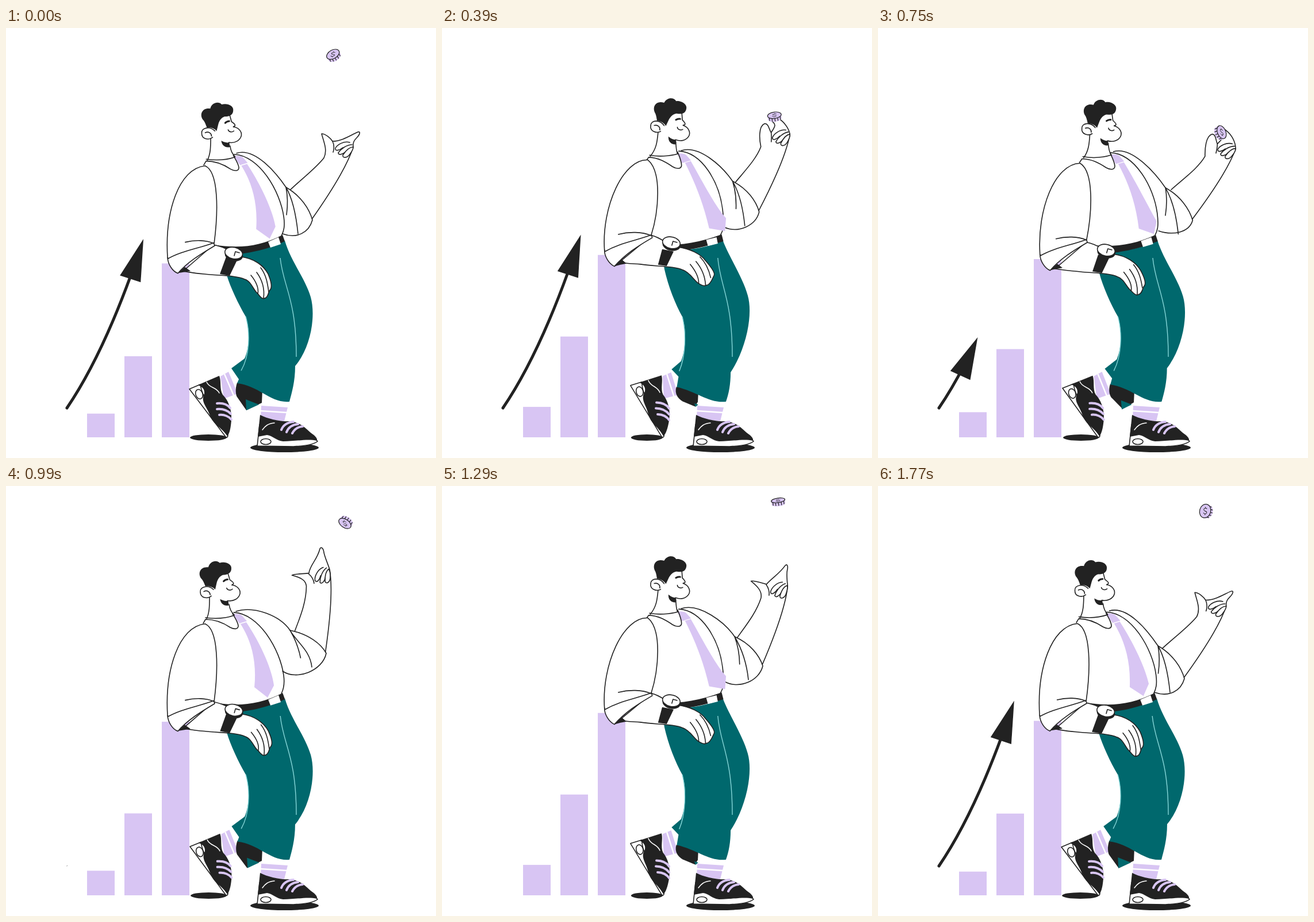
Animation, 748 px wide and 748 px high, one loop 1800 ms. Source, as an HTML page:

```html
<!DOCTYPE html>
<html lang="en">
<head>
<meta charset="utf-8">
<title>Coin toss</title>
<style>
  html, body { margin: 0; width: 100%; height: 100%; overflow: hidden; background: #fff; }
  svg { display: block; width: 100vw; height: 100vh; }
  .line { fill: none; stroke: #222; stroke-width: 1.6; stroke-linecap: round; stroke-linejoin: round; }
  .skin { fill: #fff; stroke: #222; stroke-width: 1.6; stroke-linecap: round; stroke-linejoin: round; }
  .thin { fill: none; stroke: #222; stroke-width: 1.2; }
  .brow { fill: none; stroke: #222; stroke-width: 3; stroke-linecap: round; }
  .dark { fill: #222; }
  .white { fill: #fff; }
  .teal { fill: #00686d; }
  .lilac { fill: #d8c5f3; }
  .shine { fill: none; stroke: #86d6d8; stroke-width: 1.4; }
  .lace { fill: none; stroke: #d8c5f3; stroke-width: 4; stroke-linecap: round; }
  .stripe { fill: none; stroke: #fff; stroke-width: 2.5; }
  .seam { fill: none; stroke: #fff; stroke-width: 1.5; stroke-linecap: round; }
</style>
</head>
<body>
<svg viewBox="0 0 748 748" xmlns="http://www.w3.org/2000/svg">
  <g id="bars"></g>
  <path id="shaft" class="line"/>
  <path id="arrowhead" class="dark"/>

  <ellipse id="rearShadow" class="dark" cy="712.5" ry="5.5"/>
  <g id="rearFoot">
    <path class="lilac" d="M373 606L387 598L403 636L379 645Z"/>
    <path class="stripe" d="M380 602L396 639"/>
    <path class="skin" d="M319 628L338 620C341 645 366 675 386 708C386 712 384 713 382 711Z"/>
    <path class="dark" d="M334 621L371 605C375 615 371 628 377 638C386 647 393 662 392 682C391 696 389 705 385 710C373 692 361 692 354 672C349 658 338 650 345 636C346 627 340 624 334 621Z"/>
    <ellipse class="skin" cx="336" cy="637" rx="6" ry="8.5" transform="rotate(-20 336 637)"/>
    <path class="seam" d="M349 616C354 627 366 624 371 635"/>
    <path class="lace" d="M367 653C378 652 386 656 390 661M367 663C378 662 386 666 391 671M371 673C380 672 388 676 392 681"/>
  </g>

  <ellipse class="dark" cx="484.500" cy="730" rx="59.500" ry="8"/>
  <path class="lilac" d="M444 657L490 660L484 684L443 679Z"/>
  <path class="stripe" d="M443 666L489 669"/>
  <path class="skin" d="M441 690L437 727L500 728C520 727 535 725 542 719L530 706Z"/>
  <path class="dark" d="M442 673C455 680 478 685 492 684C510 685 520 695 530 704C537 709 542 713 541 718C525 714 505 719 482 719C470 718 464 709 454 708L438 711Z"/>
  <ellipse class="skin" cx="452" cy="719.500" rx="9" ry="5"/>
  <path class="seam" d="M446 699C451 692 456 688 467 687"/>
  <path class="lace" d="M479 699C482 691 490 686 500 685M488 703C491 695 498 690 508 689M498 705C501 699 507 694 516 693"/>

  <path id="opening" class="dark"/>
  <path id="lining" class="teal"/>
  <path id="pants" class="teal"/>
  <path id="shineFront" class="shine"/>
  <path id="shineBack" class="shine"/>

  <g id="forearm">
    <path id="palm" class="skin"/>
    <path id="thumbLine" class="line"/>
  </g>
  <g id="coin">
    <path id="coinEdge" class="lilac"/>
    <path id="coinRidges" class="thin"/>
    <ellipse class="lilac" id="coinFace" rx="12" stroke="#222" stroke-width="1.2"/>
    <path id="coinSign" class="thin" d="M4 -4C1 -7 -5 -5 -3 -2C-2 1 4 0 4 3C3 7 -3 6 -4 3M0 -8V-5M0 5V8"/>
  </g>
  <g id="fingers">
    <path class="skin" d="M598 199C588 196 576 203 573 209C572 215 580 213 586 208"/>
    <path class="skin" d="M602 203C592 203 582 211 578 217C578 222 586 220 591 215"/>
    <path class="skin" d="M604 207C597 207 590 215 586 221C585 227 593 226 597 221C601 216 604 211 604 207"/>
  </g>
  <path id="sleeve" class="skin"/>
  <path id="sleeveFolds" class="line"/>

  <path id="torso" class="line"/>
  <path id="belt" class="dark"/>
  <path id="buckle" class="white"/>
  <path id="knot" class="lilac"/>
  <path id="tie" class="lilac"/>
  <path id="neck" class="line"/>
  <path id="collar" class="line"/>

  <g id="head">
    <path class="white" d="M365 165L388 150L392 163L410 182L390 199L362 190Z"/>
    <path class="line" d="M389 151L392 162C395 164 399 167 398 169L395 171C404 172 410 179 409 186C407 195 397 200 387 198"/>
    <path class="dark" d="M349 172C347 166 345 161 342 158C336 149 341 137 355 139C358 128 370 126 375 132C384 129 396 134 395 142C395 150 389 153 380 153C374 155 371 160 369 166L366 178C363 174 356 171 349 172Z"/>
    <path class="dark" d="M374 195C379 198 384 199 388 198L389 206C382 208 375 204 374 195Z"/>
    <path class="skin" d="M363 178C354 169 339 172 340 182C340 193 353 194 359 189"/>
    <path class="line" d="M346 181C352 178 357 182 357 187M386 176C387 180 393 181 396 178"/>
    <path class="brow" d="M381 164C383 162 385 161 388 161"/>
  </g>

  <path id="lowerArm" class="skin"/>
  <path id="handLines" class="line"/>
  <path id="cuffShade" class="dark"/>
  <path id="upperArm" class="skin"/>
  <path id="cuff" class="skin"/>
  <path id="armFold" class="line"/>
  <path id="strap" class="dark"/>
  <g id="watch">
    <ellipse class="dark" cx="396.500" cy="394.500" rx="16" ry="11" transform="rotate(12 396 394)"/>
    <ellipse class="skin" cx="396" cy="391.500" rx="15.500" ry="10" transform="rotate(12 396 392)"/>
    <path class="line" d="M397 396L399 389L406 391"/>
  </g>
</svg>
<script>
const LOOP = 1800, STEP = 30, SWAY = 900;
const part = {};
document.querySelectorAll('[id]').forEach(e => part[e.id] = e);

const set = (id, attrs) => { for (const k in attrs) part[id].setAttribute(k, attrs[k]); };
const mix = (a, b, k) => a + (b - a) * k;
const sway = (t, phase) => (1 - Math.cos(2 * Math.PI * (t - phase) / SWAY)) / 2;
const smooth = (a, b, t) => { const x = Math.min(1, Math.max(0, (t - a) / (b - a))); return x * x * (3 - 2 * x); };

// Blends two path strings that share the same commands.
function blend(from, to, k) {
  const ends = to.match(/-?[\d.]+/g);
  let i = 0;
  return from.replace(/-?[\d.]+/g, n => mix(+n, +ends[i++], k).toFixed(2));
}

// Looping smooth curve through [time, ...values] without overshoot; `turn` is added per loop.
function track(keys, turn = 0) {
  const n = keys.length;
  const key = i => {
    const lap = Math.floor(i / n), row = keys[i - lap * n];
    return row.map((v, j) => v + lap * (j ? turn : LOOP));
  };
  const slope = (i, j) => { const a = key(i), b = key(i + 1); return (b[j] - a[j]) / (b[0] - a[0]); };
  const tangent = (i, j) => {
    const p = slope(i - 1, j), q = slope(i, j);
    return p * q > 0 ? 2 * p * q / (p + q) : 0;
  };
  return t => {
    let i = n - 1;
    while (i >= 0 && keys[i][0] > t) i--;
    const a = key(i), b = key(i + 1), d = b[0] - a[0], x = (t - a[0]) / d, y = 1 - x;
    return a.slice(1).map((v, k) => {
      const j = k + 1;
      return v * (1 + 2 * x) * y * y + b[j] * x * x * (3 - 2 * x)
        + d * x * y * (tangent(i, j) * y - tangent(i + 1, j) * x);
    });
  };
}

// cuff x, y, elbow x, y, forearm angle, armpit x, y, wrist bend, curl
const armTrack = track([
  [0, 487, 277, 533, 334, -60.8, 481, 358, 0, 0],
  [240, 502, 265, 551, 316, -71, 487, 343, 0, 1],
  [540, 507, 270, 552, 327, -63.8, 492, 351, 0, 1],
  [720, 501, 279, 547, 336, -58, 489, 354, 0, 1],
  [990, 494, 251, 557, 291, -87.6, 481, 322, 1, 0],
  [1290, 509, 262, 558, 313, -72.7, 493, 341, .7, 0],
  [1530, 497, 276, 543, 333, -60, 486, 356, .1, 0],
  [1770, 487, 278, 533, 335, -60, 481, 359, 0, 0]
]);
const coinTrack = track([
  [0, 570, 48], [240, 567.5, 90], [450, 583, 168], [750, 592, 172], [990, 591, 63],
  [1290, 585, 28], [1440, 580, 20], [1530, 576, 23], [1770, 571, 44]
]);
const spinTrack = track([[0, -30], [240, -8], [540, -8], [990, 215], [1290, 352], [1530, 580], [1770, 645]], 720);
const squashTrack = track([[0, .62], [240, .33], [540, .6], [990, .6], [1290, .33], [1530, .65], [1770, .8]]);
const arrowTrack = track([
  [0, .977], [240, 1], [300, 1], [540, .977], [570, .96], [810, .32], [990, .004],
  [1020, 0], [1320, 0], [1350, .004], [1530, .32], [1770, .96]
]);

const bars = [[141, 664.8, 6, -15], [206, 552.3, 19, 27], [271, 401, 9.3, 60]].map(([x, mean, amp, phase]) => {
  const rect = document.createElementNS('http://www.w3.org/2000/svg', 'rect');
  rect.setAttribute('class', 'lilac');
  rect.setAttribute('x', x);
  rect.setAttribute('width', 48);
  part.bars.append(rect);
  return { rect, mean, amp, phase };
});

// id: [phase, leaning back, leaning forward]
const morphs = {
  pants: [20,
    'M366 380C385 395 440 392 485 370C495 405 520 435 530 468C539 500 531 555 503 588C503 615 497 635 493 650C460 653 440 622 402 618L405 611L392 592L415 575C424 555 424 525 417 502C404 480 390 450 384 430Z',
    'M385 378C400 390 445 388 489 370C500 398 524 435 532 465C542 500 528 560 502 600C502 620 499 637 494 650C465 653 445 634 409 625L412 606L400 594L416 580C425 555 425 525 418 502C406 480 394 450 387 418Z'],
  opening: [20, 'M402 617C398 628 400 640 402 642L418 665L445 652L446 630L420 615Z', 'M408 625C405 636 410 644 420 650L442 658L445 650L446 632L424 624Z'],
  lining: [0, 'M417 646L440 655L418 665Z', 'M440 653L446 655L442 659Z'],
  shineFront: [20, 'M477 400C482 450 505 470 505 572', 'M480 400C484 450 505 470 505 572'],
  shineBack: [20, 'M417 502C425 530 424 570 409 596', 'M418 502C425 530 424 570 413 597'],
  torso: [60, 'M396 220C440 222 477 285 483 330C485 345 483 353 479 361', 'M415 213C455 215 483 265 489 312C493 345 490 353 485 361'],
  belt: [30, 'M361 377C405 384 440 381 481 360L485 371C455 385 430 391 390 395Z', 'M385 378C420 377 450 372 487 359L490 371C455 381 430 386 390 390Z'],
  buckle: [30, 'M456 372L474 364L478 376L460 382Z', 'M460 368L478 364L480 375L463 379Z'],
  knot: [80, 'M394 224C400 222 405 222 410 225L419 235L406 239Z', 'M414 218C420 216 426 217 429 220L437 229L421 234Z'],
  tie: [80, 'M408 240L418 237C440 270 462 315 466 347L455 368L432 350C437 300 424 265 408 240Z', 'M427 233L437 230C460 272 480 310 502 326L503 349L474 348C458 300 442 265 427 233Z'],
  neck: [80, 'M354 193C354 208 354 220 349 231M388 206C389 213 391 219 397 224M347 229C362 231 380 231 397 225', 'M382 179C380 196 378 208 366 221M412 195C412 203 412 210 413 217M365 219C380 222 400 221 415 217'],
  collar: [75, 'M343 239L347 232C365 232 378 238 390 246C398 250 404 249 404 243C403 236 398 229 394 222', 'M358 229L363 223C380 224 392 232 404 240C412 245 419 244 420 238C420 230 417 222 414 214'],
  upperArm: [45, 'M346 240C300 245 276 320 281 400L292 408L362 375C369 320 370 250 346 240Z', 'M360 228C318 224 277 310 283 386L293 396L364 359C378 320 385 250 360 228Z'],
  cuff: [40, 'M281 400C282 412 290 424 299 427C315 408 338 394 363 379L361 374C335 384 305 388 281 402', 'M283 384C282 394 290 408 300 413C320 391 340 378 366 363L365 358C335 369 310 372 284 387'],
  armFold: [45, 'M312 373C328 369 348 369 361 375', 'M306 357C325 352 348 352 364 359'],
  cuffShade: [40, 'M298 427L311 416L321 423C315 424 306 425 298 427Z', 'M300 413L313 401L321 408C315 409 306 411 300 413Z'],
  lowerArm: [5,
    'M361 377C370 379 378 381 386 386L409 398C432 401 448 413 456 428C461 440 464 451 459 456C456 458 457 469 450 470C446 473 441 466 438 462C431 458 427 440 415 437C400 430 370 431 345 428C330 427 320 425 308 423Z',
    'M365 360C374 362 380 366 388 371L409 380C432 383 450 392 459 404C469 415 476 425 474 429C472 432 468 446 461 446C456 450 449 444 446 443C438 437 432 425 419 420C405 413 370 414 345 410C330 409 320 409 308 407Z'],
  handLines: [5, 'M443 417C453 430 455 445 457 459M436 425C447 440 450 455 448 470M426 430C436 442 440 454 438 462', 'M449 397C460 408 465 420 468 433M442 405C453 418 458 430 459 446M432 410C441 421 447 432 447 443'],
  strap: [5, 'M383 398L402 404L389 431L372 428Z', 'M383 384L403 388L391 413L376 411Z']
};

const palmOpen = 'M494 282C515 262 540 243 553 226C560 212 552 196 549 184C556 184 565 192 568 197C585 197 600 186 612 181C617 179 616 185 610 191C606 195 603 199 604 207C592 245 555 300 531 334';
const palmBent = 'M494 282C515 262 540 243 555 214C559 203 551 195 541 186C545 185 560 193 569 196C577 184 592 182 605 167C608 164 611 167 609 174C606 182 606 196 604 207C592 245 555 300 531 334';
const palmCurled = 'M494 282C515 262 540 243 551 222C550 210 551 186 563 183C570 184 569 195 572 200C578 192 586 188 573 178C571 173 580 171 586 176C596 183 603 195 604 207C592 245 555 300 531 334';

function drawBody(t) {
  for (const { rect, mean, amp, phase } of bars) {
    const top = mean + amp * (1 - 2 * sway(t, phase));
    rect.setAttribute('y', top);
    rect.setAttribute('height', 712 - top);
  }
  for (const id in morphs) {
    const [phase, back, forward] = morphs[id];
    set(id, { d: blend(back, forward, sway(t, phase)) });
  }
  const lean = sway(t, 80), step = sway(t, -10), lift = sway(t, 5);
  set('head', { transform: `translate(${-2 + 32 * lean} ${2.5 - 17 * lean}) rotate(${-1.5 + 16.5 * lean} 350 182)` });
  set('rearFoot', { transform: `rotate(${6 * step} 384 712)` });
  set('rearShadow', { cx: 352 + 4.5 * step, rx: 32 - 4.5 * step });
  set('watch', { transform: `translate(${3 * lift} ${-19 * lift})` });
}

function drawArm(t) {
  const [ax, ay, ex, ey, angle, px, py, bend, curl] = armTrack(t);
  const turn = angle + 60.8, lean = sway(t, 70);
  const arm = `translate(${ex - 533} ${ey - 334}) rotate(${turn} 533 334)`;
  set('forearm', { transform: arm });
  set('fingers', { transform: `${arm} rotate(${-9 * bend} 592 212)` });
  set('palm', { d: blend(blend(palmOpen, palmBent, bend), palmCurled, curl) });
  set('thumbLine', { d: blend('M568 197C571 203 571 211 569 216', 'M572 200C572 205 571 211 570 216', curl) });

  const sx = mix(400, 420, lean), sy = mix(218, 212, lean), dx = ex - ax, dy = ey - ay;
  const sag = -turn * .3;
  set('sleeve', {
    d: `M${sx} ${sy}C${sx + 32} ${sy - 10} ${ax - 17} ${ay - 25} ${ax} ${ay}` +
       `C${ax + dx * .45 + 5} ${ay + dy * .45 - 11} ${ex - dx * .2 + 4} ${ey - dy * .2 - 8} ${ex} ${ey}` +
       `C${ex - 6} ${ey + 22 + sag} ${px + 25} ${py + 9 + sag} ${px} ${py}`
  });
  const fx = 1 - turn * .65;
  set('sleeveFolds', {
    d: `M${ax} ${ay}C${ax + 13} ${ay + 22} ${ex - 28} ${ey - 5} ${ex - 25} ${ey + 24}` +
       `M${ax} ${ay}q${fx / 2 + 4} 22 ${fx} 48`
  });

  const r = turn * Math.PI / 180, c = Math.cos(r), s = Math.sin(r);
  return [ex + 45 * c + 149 * s, ey + 45 * s - 149 * c];
}

function drawCoin(t, grip) {
  const hold = smooth(420, 480, t) - smooth(720, 800, t);
  const [x, y] = coinTrack(t).map((v, i) => mix(v, grip[i], hold));
  const [phi] = spinTrack(t), [q] = squashTrack(t);
  const R = 12, depth = 6.5 * Math.sqrt(1 - q * q), top = -depth / 2;
  set('coin', { transform: `translate(${x} ${y}) rotate(${phi})` });
  set('coinFace', { cy: top, ry: R * q });
  set('coinEdge', { d: `M${-R} ${top}V${-top}A${R} ${R * q} 0 0 0 ${R} ${-top}V${top}Z` });
  set('coinRidges', {
    d: [-9.5, -5, 0, 5, 9.5].map(rx => `M${rx} ${top + q * Math.sqrt(R * R - rx * rx)}v${depth * .9}`).join('')
  });
  set('coinSign', { transform: `translate(0 ${top}) scale(1 ${q}) rotate(${-phi}) scale(.9)` });
}

function drawArrow(t) {
  const [u] = arrowTrack(t), shown = u > .002 ? 'visible' : 'hidden';
  const size = Math.min(1, u * 2.4), v = Math.max(0, u - .17 * size);
  const at = (k, a, b, c) => mix(mix(a, b, k), mix(b, c, k), k);
  const xs = [106, 178, 242], ys = [661, 555, 358];
  const tx = at(u, ...xs), ty = at(u, ...ys);
  const dx = mix(72, 64, u), dy = mix(-106, -197, u), len = Math.hypot(dx, dy);
  const nx = dx / len, ny = dy / len, bx = tx - nx * 73 * size, by = ty - ny * 73 * size, w = 19 * size;
  set('shaft', {
    visibility: shown,
    style: `stroke-width:${Math.min(5, u * 200)}`,
    d: `M106 661Q${mix(106, 178, v)} ${mix(661, 555, v)} ${at(v, ...xs)} ${at(v, ...ys)}`
  });
  set('arrowhead', { visibility: shown, d: `M${tx} ${ty}L${bx - ny * w} ${by + nx * w}L${bx + ny * w} ${by - nx * w}Z` });
}

function draw(now) {
  const t = Math.floor(now % LOOP / STEP) * STEP;
  drawBody(t);
  drawCoin(t, drawArm(t));
  drawArrow(t);
}

const start = performance.now();
function tick() {
  draw(performance.now() - start);
  requestAnimationFrame(tick);
}
tick();
</script>
</body>
</html>
```
